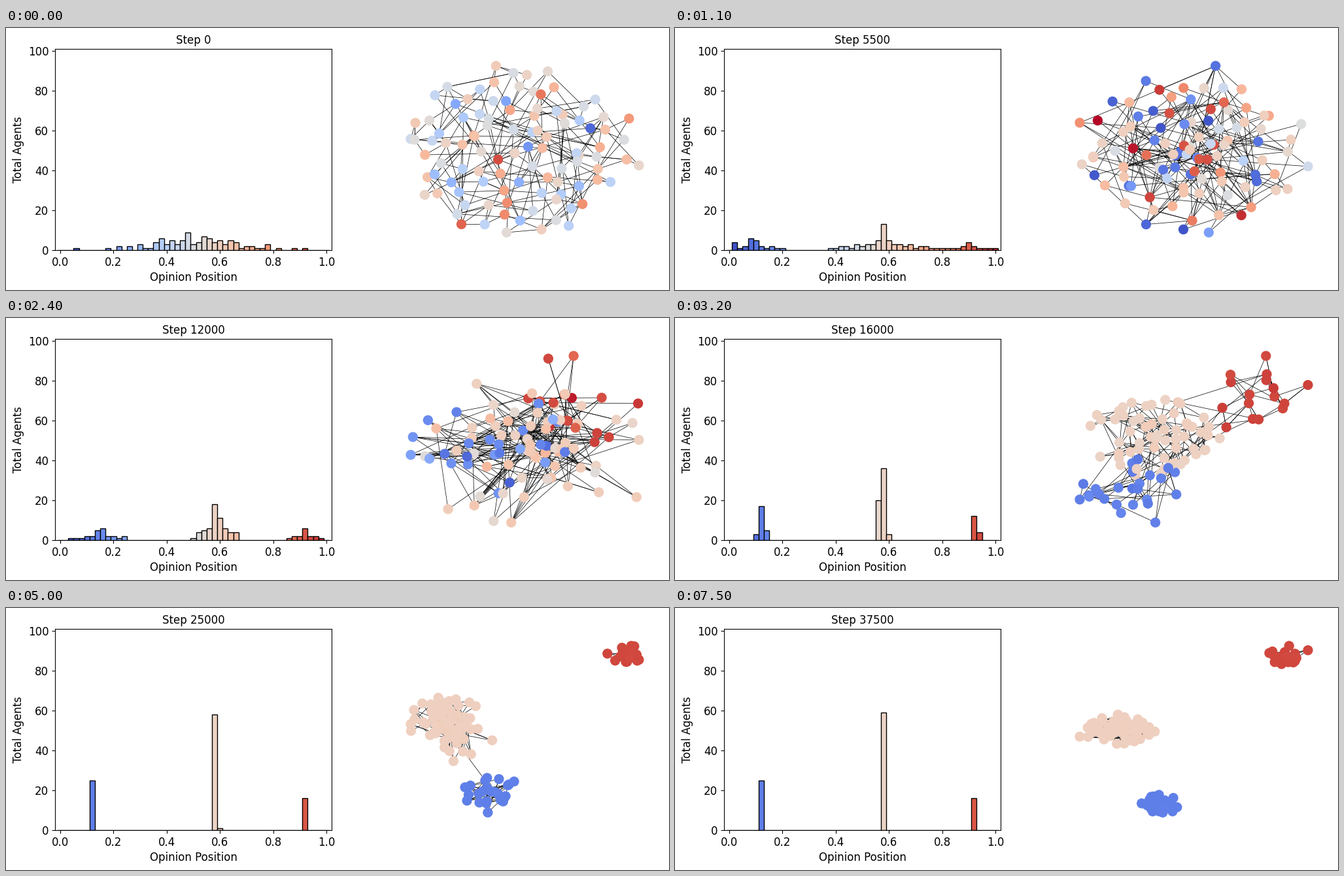
These frames come from a looping animation (1014x401 px, 7600 ms). A matplotlib script:

```python
import numpy as np
import matplotlib.pyplot as plt
from matplotlib.animation import FuncAnimation
from matplotlib.collections import LineCollection

W, H, DPI = 1014, 401, 100
N, FRAMES, STEP = 100, 76, 500
BIN = 0.02
BOX = np.array([[619, 58], [968, 313]])
SIZES = [25, 59, 16]
GROUP = np.repeat([0, 1, 2], SIZES)
BRIDGE = SIZES[0] + SIZES[1] - 1
rng = np.random.default_rng(11)
cmap = plt.get_cmap("coolwarm")

# Opinion centre and half-width of the three groups over time
OPINION_TIMES = [11, 24, 32, 41]
CENTER = np.array([[.09, .58, .90], [.15, .588, .92],
                   [.122, .572, .926], [.12, .58, .92]])
WIDTH = np.array([[.11, .19, .11], [.10, .08, .06],
                  [.02, .017, .012], [.003, .003, .003]])

# Ellipse (cx, cy, rx, ry) of each group over time
CLOUD_TIMES = [0, 11, 24, 32, 41, 60, 75]
CLOUDS = np.array([
    [(793, 186, 174, 127)] * 3,
    [(800, 190, 174, 127)] * 3,
    [(745, 195, 110, 80), (795, 205, 160, 115), (835, 135, 75, 75)],
    [(715, 270, 95, 45), (735, 195, 105, 55), (885, 135, 80, 75)],
    [(712, 280, 48, 36), (682, 155, 64, 52), (938, 90, 30, 32)],
    [(768, 290, 30, 24), (672, 220, 50, 32), (937, 77, 28, 20)],
    [(750, 299, 33, 15), (675, 188, 65, 25), (942, 75, 32, 17)],
])
TAILS = [.5, .75, .9, .65, .65, .65, .65]


def over_time(n, times, table):
    flat = table.reshape(len(times), -1)
    row = [np.interp(n, times, col) for col in flat.T]
    return np.reshape(row, table.shape[1:])


# Opinions: one bell-shaped crowd that parts into three narrowing groups
quantile = (np.arange(N) + .5) / N
bell = .515 + .085 * np.log(quantile / (1 - quantile))
BELL = np.sort(np.clip(bell + rng.normal(0, .012, N), .04, .91))
z = np.concatenate([np.linspace(-1, 1, m) for m in SIZES])
SKEW = np.sign(z) * z ** 2


def stray(n):
    """How far the last undecided agent has left its group."""
    return np.exp(-((n - 41) / 6) ** 2)


def opinions(n):
    center = over_time(n, OPINION_TIMES, CENTER)[GROUP]
    width = over_time(n, OPINION_TIMES, WIDTH)[GROUP]
    ops = center + width * SKEW
    ops[BRIDGE] += .1 * stray(n)
    ops[BRIDGE - 2:BRIDGE] += .04 * stray(n)
    u = min(n / OPINION_TIMES[0], 1)
    return np.clip((1 - u) * BELL + u * ops, .02, 1)


def scatter(tail):
    """Unit offsets: golden-angle spirals on a rounded diamond, shuffled."""
    order = rng.permutation(N)
    r = ((order + .5) / N) ** tail
    a = order * np.pi * (3 - 5 ** .5) + rng.uniform(0, 7)
    c, s = np.cos(a), np.sin(a)
    r = r / (abs(c) ** 1.65 + abs(s) ** 1.65) ** (1 / 1.65)
    return np.c_[r * c, r * s] + rng.normal(0, .045, (N, 2))


OFFSETS = [scatter(t) for t in TAILS]


def layout(n):
    k = min(np.searchsorted(CLOUD_TIMES, n, side="right"),
            len(CLOUD_TIMES) - 1)
    start, end = CLOUD_TIMES[k - 1:k + 1]
    turn = np.pi / 2 * (n - start) / (end - start)
    # Cosine and sine weights keep the clouds from shrinking on the way
    unit = np.cos(turn) * OFFSETS[k - 1] + np.sin(turn) * OFFSETS[k]
    unit += np.random.default_rng(n).normal(0, .03, (N, 2))
    cloud = over_time(n, CLOUD_TIMES, CLOUDS)
    pos = cloud[GROUP, :2] + cloud[GROUP, 2:] * unit
    middle = cloud[:2, :2].mean(0)
    pos[BRIDGE] += stray(n) * (middle - pos[BRIDGE])
    low, high = pos.min(0), pos.max(0)
    return BOX[0] + (pos - low) / (high - low) * (BOX[1] - BOX[0])


def partners(pos, reach, allowed):
    """A random, mostly nearby agent for every link owner."""
    d = np.linalg.norm(pos[OWNER, None] - pos, axis=2)
    w = np.exp(-d / reach) * (d > 12) * allowed
    return [rng.choice(N, p=p / p.sum()) for p in w]


# Each agent owns two links, rewired twice: at random, then inside its group
OWNER = np.repeat(np.arange(N), 2)
popular = .3 + rng.exponential(1, N) ** 1.5
same = (GROUP[OWNER, None] == GROUP) & (np.arange(N) != BRIDGE)
LINKS = np.array([
    partners(layout(0), 45, 1),
    partners(layout(11), 80, popular),
    partners(layout(32), 35, same),
])
LINKS[2, OWNER == BRIDGE] = [BRIDGE - 1, BRIDGE - 2]
FIRST = rng.uniform(0, 11, OWNER.size)
SECOND = rng.uniform(12, 34, OWNER.size)


def links(n):
    stage = (n > FIRST).astype(int) + (n > SECOND)
    pairs = np.c_[OWNER, LINKS[stage, np.arange(OWNER.size)]]
    if 33 <= n < 67:
        pairs = np.vstack([pairs, [BRIDGE, 0]])
    return pairs


fig = plt.figure(figsize=(W / DPI, H / DPI), dpi=DPI, facecolor="white")
plt.rcParams.update({"font.family": "DejaVu Sans", "font.size": 12})

ax = fig.add_axes([75 / W, 61 / H, 423 / W, 308 / H])
ax.set_xlim(-.02, 1.02)
ax.set_ylim(0, 101)
ax.set_xticks(np.arange(0, 1.1, .2))
ax.set_yticks(range(0, 101, 20))
ax.tick_params(labelsize=12)
ax.set_xlabel("Opinion Position", fontsize=12)
ax.set_ylabel("Total Agents", fontsize=12)
title = ax.set_title("", fontsize=12)
centers = np.arange(51) * BIN
bars = ax.bar(centers, np.zeros(51), width=BIN, color=cmap(centers * .97),
              edgecolor="black", linewidth=1)

net = fig.add_axes([0, 0, 1, 1])
net.set_xlim(0, W)
net.set_ylim(H, 0)
net.axis("off")
lines = LineCollection([], colors="black", linewidths=.5, zorder=1)
net.add_collection(lines)
dots = net.scatter(np.zeros(N), np.zeros(N), s=100, linewidths=1, zorder=2)
DRAW_ORDER = rng.permutation(N)


def draw(n):
    ops, pos = opinions(n), layout(n)
    counts = np.bincount(np.rint(ops / BIN).astype(int), minlength=51)
    for bar, c in zip(bars, counts):
        bar.set_height(c)
    title.set_text(f"Step {n * STEP}")
    lines.set_segments(pos[links(n)])
    dots.set_offsets(pos[DRAW_ORDER])
    colors = cmap(ops[DRAW_ORDER])
    dots.set_facecolor(colors)
    dots.set_edgecolor(colors)
    return [*bars, title, lines, dots]


anim = FuncAnimation(fig, draw, frames=FRAMES, interval=100,
                     init_func=lambda: draw(0), repeat=True, repeat_delay=0)
plt.show()
```
